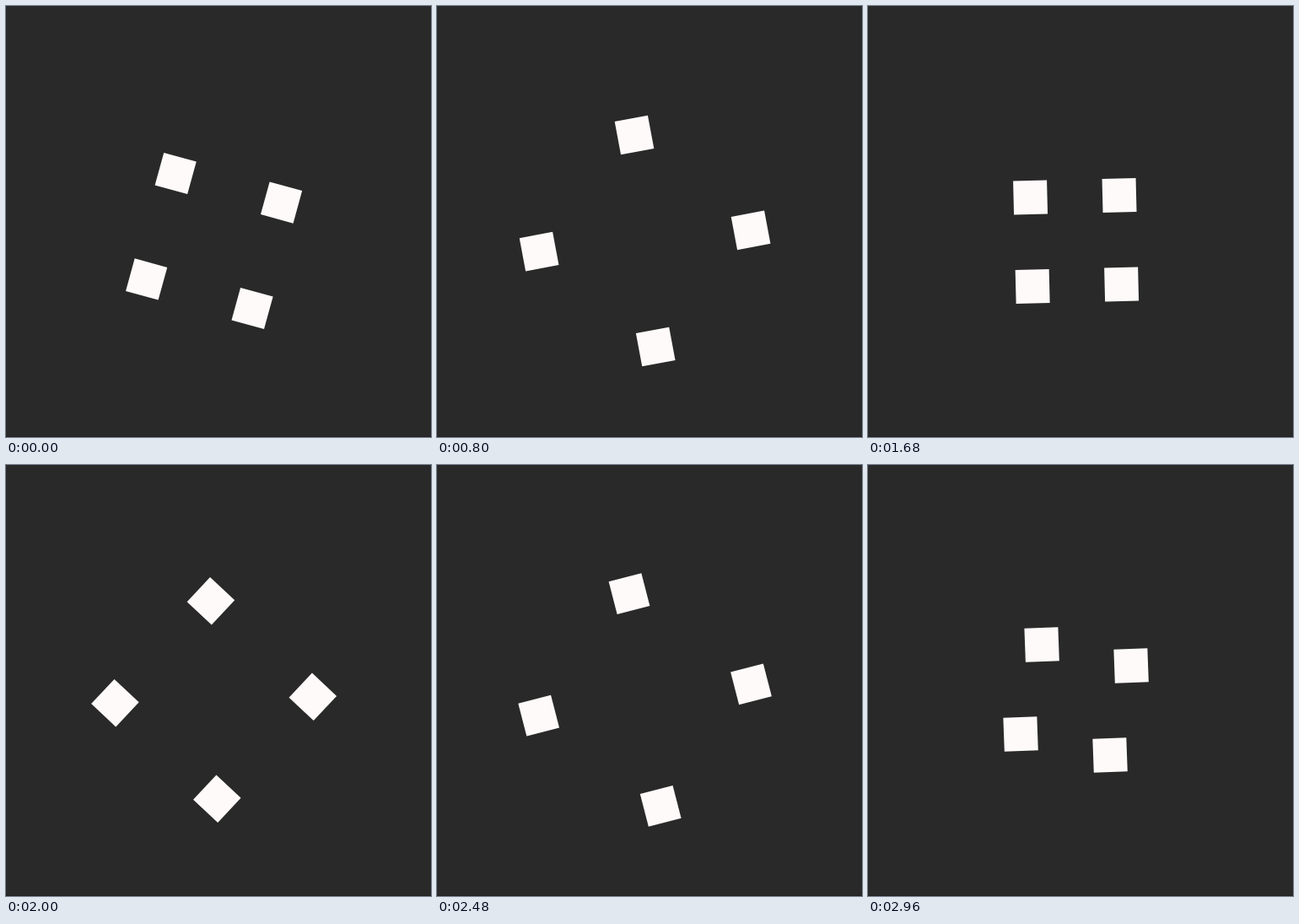
An HTML page that plays this animation: 504 by 511 pixels, repeating every 3.04 s.

```html
<!DOCTYPE html>
<html lang="en">
<head>
<meta charset="utf-8">
<title>Spinning squares</title>
<style>
  html, body { margin: 0; width: 100%; height: 100%; overflow: hidden; background: #292929; }
  svg { display: block; width: 504px; height: 511px; }
</style>
</head>
<body>
<svg viewBox="0 0 504 511">
  <rect y="510" width="504" height="1" fill="#231f21"/>
  <g id="squares" fill="#fffafa" transform="translate(246.6 278.5)"></g>
</svg>
<script>
  const LOOP = 3040;
  const PERIOD = 21.2; // motion cycle, in drawing steps
  const JOIN = 17.5;   // step at which the squares meet

  // Keys: step, distance from centre, orbit angle, own angle.
  // Spreading: the four turn as one rigid body.
  const spread = [
    [-3.7, 28.3, -39.5], [-2.2, 57.5, -16.4], [-1.2, 74.6, -1.4],
    [0, 92, 15.4], [2.8, 117.3, 43.2], [4.15, 121, 50.5]
  ].map(k => [...k, k[2]]);

  // A fast whirl that slows down, then closes in while each square gains a quarter turn.
  const gather = [
    [4.15, 121, 50.5, 50.5], [5, 127, 93.7, 101.6], [6, 134.5, 138, 154.5],
    [7.8, 133, 197.9, 231], [8.8, 127.3, 216.6, 255.5], [13, 101.5, 261.6, 325],
    [14, 89, 273.2, 344], [14.8, 77, 283.3, 357.9], [JOIN, 28.3, 320.5, 410.5]
  ];

  const group = document.getElementById('squares');
  const squares = [0, 90, 180, 270].map(angle => {
    const el = document.createElementNS('http://www.w3.org/2000/svg', 'rect');
    for (const [name, value] of Object.entries({ x: -20, y: -20, width: 40, height: 40 })) {
      el.setAttribute(name, value);
    }
    group.append(el);
    return { el, angle: angle - 135 };
  });

  // Monotone cubic interpolation of one column.
  function sample(keys, col, p) {
    const last = keys.length - 2;
    let i = 0;
    while (i < last && p >= keys[i + 1][0]) i++;
    const slope = j => (keys[j + 1][col] - keys[j][col]) / (keys[j + 1][0] - keys[j][0]);
    const tangent = j => {
      if (j === 0) return slope(0);
      if (j > last) return slope(last);
      const a = slope(j - 1), b = slope(j);
      return a * b > 0 ? 2 * a * b / (a + b) : 0;
    };
    const h = keys[i + 1][0] - keys[i][0];
    const u = (p - keys[i][0]) / h, v = 1 - u;
    return v * v * (1 + 2 * u) * keys[i][col] + u * u * (3 - 2 * u) * keys[i + 1][col]
      + h * u * v * (v * tangent(i) - u * tangent(i + 1));
  }

  // The motion is drawn in steps of 90 ms, later 80 ms.
  const stepAt = t => Math.floor(t < 720 ? t / 90 : 8 + (t - 720) / 80);

  function draw(now) {
    let p = stepAt(now % LOOP);
    if (p > JOIN) p -= PERIOD;
    const keys = p < 4.15 ? spread : gather;
    const [radius, orbit, spin] = [1, 2, 3].map(col => sample(keys, col, p));
    for (const { el, angle } of squares) {
      const a = (orbit + angle) * Math.PI / 180;
      el.setAttribute('transform',
        `translate(${radius * Math.cos(a)} ${radius * Math.sin(a)}) rotate(${spin})`);
    }
  }

  const start = performance.now();
  function tick() {
    draw(performance.now() - start);
    requestAnimationFrame(tick);
  }
  tick();
</script>
</body>
</html>
```
